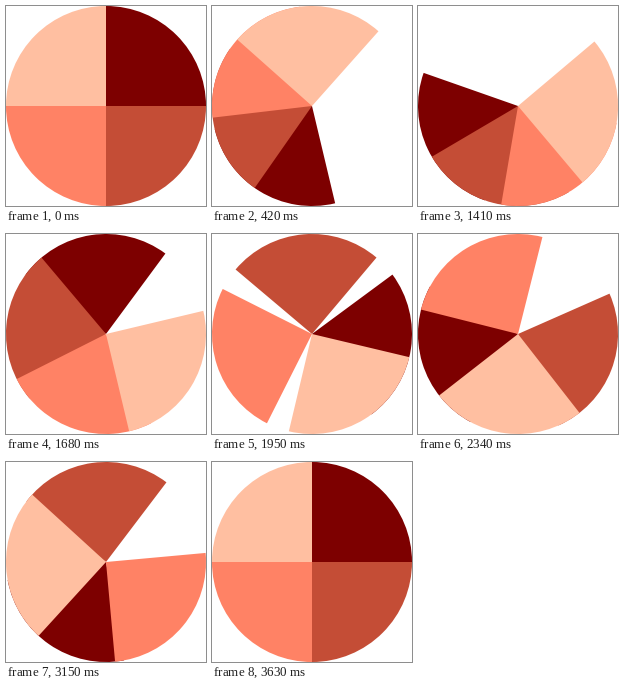
A matplotlib script for the animation above (3.66 s loop, 200x200 px).

```python
import matplotlib.pyplot as plt
from matplotlib.animation import FuncAnimation
from matplotlib.patches import Wedge

SIZE = 200
FRAMES = 122
INTERVAL = 30
CENTER = (SIZE / 2, SIZE / 2)

# Bottom to top: colour, starting angle (clockwise from 12 o'clock), turns per loop
SECTORS = [
    ("#7d0000", 0, 4),
    ("#c44d36", 90, 3),
    ("#ff8265", 180, 2),
    ("#ffbfa1", 270, 1),
]

fig = plt.figure(figsize=(SIZE / 100, SIZE / 100), dpi=100, facecolor="white")
ax = fig.add_axes([0, 0, 1, 1])
ax.set_xlim(0, SIZE)
ax.set_ylim(SIZE, 0)
ax.axis("off")

wedges = []
for layer, (color, start, _) in enumerate(SECTORS):
    wedge = Wedge(CENTER, SIZE / 2, start - 90, start,
                  facecolor=color, edgecolor="none", linewidth=0, zorder=layer + 1)
    wedges.append(ax.add_patch(wedge))


def update(frame):
    swing = 360 * frame / (FRAMES - 1)
    for wedge, (_, start, turns) in zip(wedges, SECTORS):
        angle = (start + turns * swing) % 360 - 90
        wedge.set_theta1(angle)
        wedge.set_theta2(angle + 90)
    return wedges


anim = FuncAnimation(fig, update, frames=FRAMES, init_func=lambda: update(0),
                     interval=INTERVAL, repeat=True, repeat_delay=0, blit=False)
plt.show()
```
